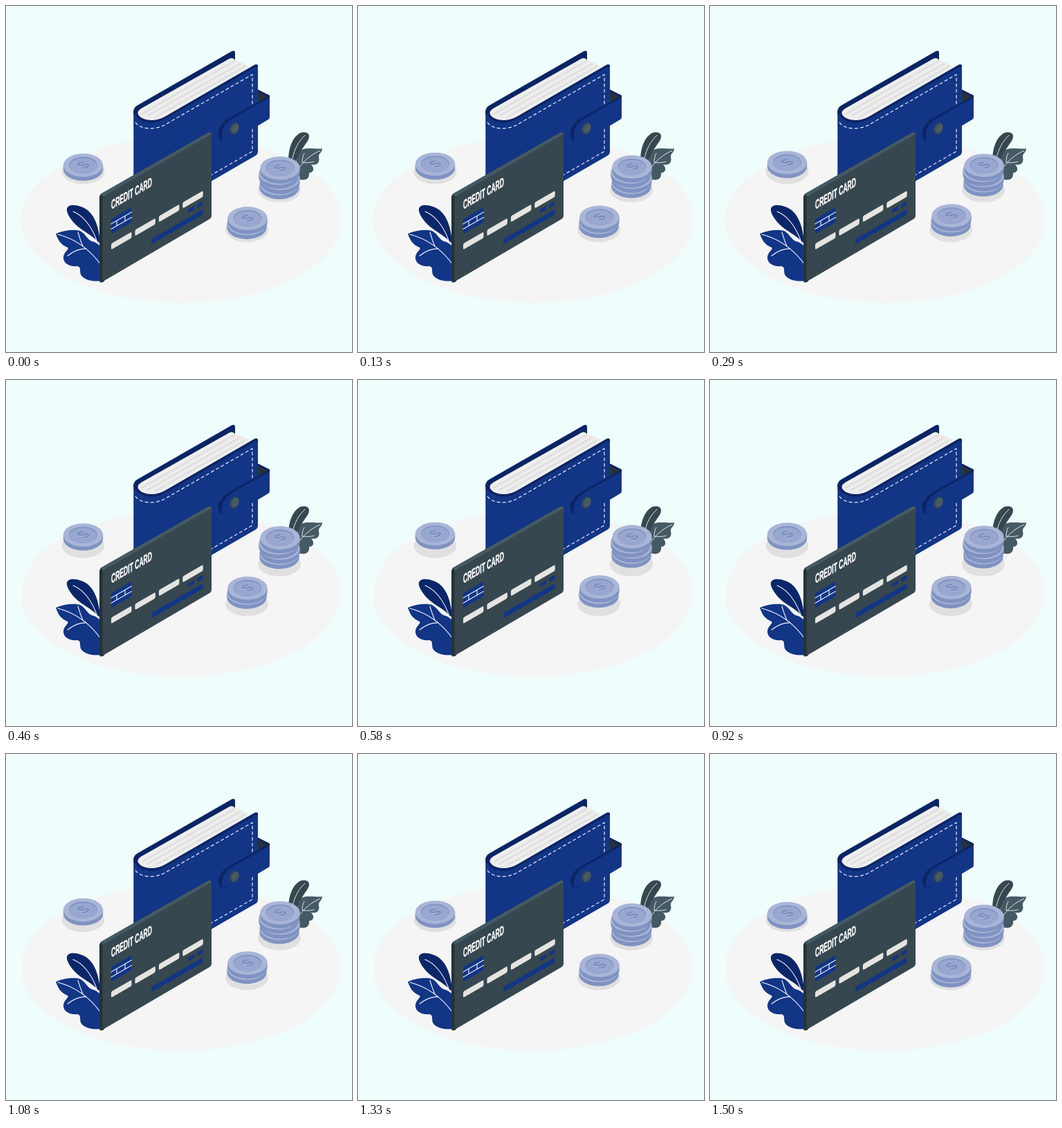
An HTML page that plays this animation: 500 by 500 pixels, repeating every 1.54 s.

```html
<!DOCTYPE html>
<html lang="en">
<head>
<meta charset="utf-8">
<title>Wallet and coins</title>
<style>
  html, body { margin: 0; width: 100%; height: 100%; overflow: hidden; background: #f0fdfd; }
  svg { display: block; width: 100vw; height: 100vh; }
  .line { fill: none; stroke: #f2f5fa; stroke-linecap: round; }
  .word { font: bold 18.5px "Liberation Sans", Arial, sans-serif; fill: #fff; stroke: #fff; stroke-width: .5; }
  .sign { font: bold 23px "Liberation Sans", Arial, sans-serif; text-anchor: middle; }
</style>
</head>
<body>
<svg viewBox="0 0 500 500">
  <defs>
    <g id="coin">
      <path d="M-28.7 0V5.700A28.7 16.8 0 0 0 28.7 5.700V0Z" fill="#7f92c2"/>
      <ellipse rx="28.7" ry="16.8" fill="#a9b5d7"/>
    </g>
    <g id="face">
      <ellipse rx="20.5" ry="12" fill="#7f92c2"/>
      <ellipse cy=".9" rx="19.8" ry="11.1" fill="#98a7cf"/>
      <g class="sign">
        <text transform="matrix(.78 -.45 .78 .45 0 .8)" y="8" fill="#b3bedc">$</text>
        <text transform="matrix(.78 -.45 .78 .45 0 -.2)" y="8" fill="#778bbd">$</text>
      </g>
    </g>
  </defs>

  <ellipse cx="253" cy="309" rx="231" ry="120" fill="#f5f5f5"/>
  <g fill="#e0e0e0">
    <ellipse cx="111.5" cy="239.5" rx="31" ry="17.8"/>
    <ellipse cx="348" cy="323.5" rx="31" ry="17.8"/>
    <ellipse cx="395" cy="266" rx="31" ry="17.8"/>
  </g>

  <g id="rightPlant">
    <path d="M408 224C408 205 414 190 424 184C431 181 438 183 438 188C438 195 432 199 428 207C425 214 423 220 417 226Z" fill="#37474f"/>
    <path d="M416 232C421 221 423 211 429 207C437 204 447 207 457 206C457 212 451 213 452 219C454 226 449 231 441 229C446 234 445 241 438 241C439 248 434 254 423 250Z" fill="#455a64"/>
    <path class="line" stroke-width=".9" d="M414 220C417 206 423 195 432 187M422 236C430 224 440 215 454 209M428 226C428 221 429 216 431 213M429 226C436 227 441 226 445 225"/>
  </g>

  <g id="wallet">
    <g transform="translate(0 -1)">
      <path d="M184.300 158V153Q184.300 148 190 144.500L326 66.500Q331 64 331 69V85L220 168Z" fill="#0b2463"/>
      <path d="M190.500 155Q191 151 199 147L323 77Q328 75 331 79Q336 78 338 82Q344 81 345 85Q351 85 350 91L234 159C221 168 204 168 196 162Q190 159 190.500 155Z" fill="#eeeeee"/>
      <path d="M196 157L331 80M204 160L339 84M215 162L346 88" fill="none" stroke="#e0e0e0" stroke-width="3"/>
    </g>
    <path d="M364 121L381 129.500V135L364 147Z" fill="#1d2c48"/>
    <path d="M364 121L381 129.500L364 139Z" fill="#263238"/>
    <path d="M364 121L381 129.500L378 131L364 123.500Z" fill="#0b2463"/>
    <g transform="translate(0 -1)">
      <path d="M184.300 152C186 167 211 176 234 162L360 88Q364 86 364 89V211Q364 215 361 217L297 254L184.300 318Z" fill="#123586"/>
      <path d="M186 152C187 166 211 174 232 161.500L360 87.500Q362.500 86 362.500 89" fill="none" stroke="#0b2463" stroke-width="3.600"/>
      <path d="M187 169C193 179 214 181 229 173L356 100V211L297 245" fill="none" stroke="#e9edf6" stroke-width="1.200" stroke-dasharray="5 3.200"/>
    </g>
    <path d="M381 129.500L321 163C309 170 304 183 308 190Q310 195 316 193L381 160Z" fill="#0b2463"/>
    <path d="M381 132L325 164C314 171 309 185 313 194L364 173L379 164Q381 163 381 160Z" fill="#123586"/>
    <g transform="translate(330 177) rotate(25)">
      <ellipse rx="6.700" ry="8.700" fill="#37474f"/>
      <ellipse cx="1" cy="-.3" rx="5" ry="7.200" fill="#455a64"/>
    </g>
  </g>

  <g id="coins"></g>

  <g id="leftPlant">
    <path d="M134 342C123 329 108 325 97 312C88 301 85 292 91 289C97 286 111 289 119 296C130 306 134 322 136 340Z" fill="#0c2769"/>
    <path d="M72 329C86 323 100 323 107 325C115 329 117 337 124 340C132 342 135 346 138 350V397C126 399 112 396 108 388C106 382 109 377 103 376C94 377 83 373 83 364C83 355 92 352 89 349C79 345 75 338 72 329Z" fill="#123586"/>
    <path class="line" stroke-width="1.100" d="M97 297C112 303 124 319 131 339M75 330C98 336 120 350 137 374M104 327C106 334 108 340 111 347M89 361C98 354 107 350 116 351"/>
  </g>

  <g id="card">
    <path d="M135 276Q135 273 138 271L292 183Q297 181 297 187L142 276V398Q135 402 135 396Z" fill="#263238"/>
    <path d="M137 271.600L292 183Q297 181 297 187L141 277Z" fill="#455a64"/>
    <path d="M139.500 279Q139.500 276 142.500 274L293 187.500Q297 185 297 189V303.500Q297 306 294 308L142 397Q139.500 398.500 139.500 396Z" fill="#37474f"/>
    <text class="word" transform="matrix(.463 -.267 0 1 152 294)">CREDIT CARD</text>
    <g transform="matrix(1 -.577 0 1 152 343.4)">
      <rect y="-35.500" width="29.500" height="21.500" rx="1.500" fill="#123586"/>
      <path class="line" stroke-width="1.100" d="M0 -28.500H29.500M0 -21H29.500M8 -28.500V-21M20 -28.500V-21"/>
      <g id="digits" fill="#e4e4e2"></g>
      <g fill="#123586">
        <rect x="58" y="27" width="74.500" height="7.500" rx="1.500"/>
        <rect x="111.500" y="15" width="8.500" height="5.500" rx="1.200"/>
        <rect x="124" y="15" width="8.500" height="5.500" rx="1.200"/>
      </g>
    </g>
  </g>
</svg>
<script>
  const LOOP = 1540, STEP = 1000 / 24;
  const coins = document.getElementById("coins");

  // x positions run from the top coin down
  function stack(y, xs) {
    let out = "";
    for (let i = xs.length - 1; i >= 0; i--) {
      out += `<use href="#coin" x="${xs[i]}" y="${y + i * 7.5}"/>`;
    }
    return out + `<use href="#face" x="${xs[0]}" y="${y}"/>`;
  }

  coins.innerHTML = stack(230.5, [111.5]) + stack(307.3, [349, 348]) + stack(234.6, [396, 394, 396, 395]);

  document.getElementById("digits").innerHTML = [0, 34.4, 68.9, 103.3]
    .map(x => `<rect x="${x}" width="29.500" height="8.800" rx="2"/>`).join("");

  // Linear rise and fall of ten units, stepped at 24 per second
  function lift(ms) {
    const t = Math.floor((ms % LOOP + 5) / STEP) * STEP + 30;
    return Math.max(0, 10 - Math.abs(t - 750) / 75);
  }

  function draw(now) {
    coins.setAttribute("transform", `translate(0 ${-lift(now).toFixed(3)})`);
  }

  let start;
  function tick(now) {
    start ??= now;
    draw(now - start);
    requestAnimationFrame(tick);
  }
  draw(0);
  requestAnimationFrame(tick);
</script>
</body>
</html>
```
